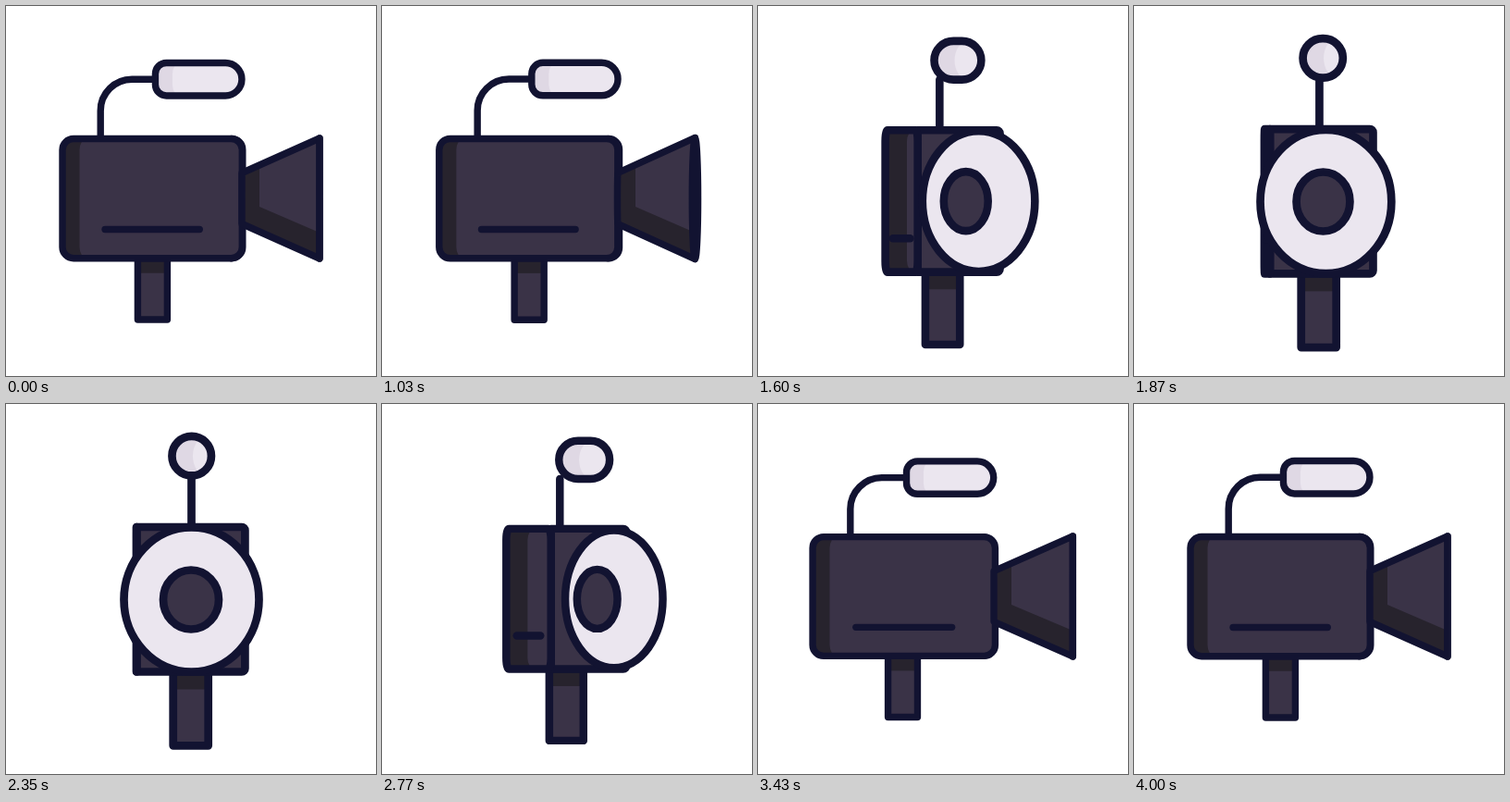
Write an HTML page with a canvas that moves like this. It is 400x400 px and loops after 4030 ms.

```html
<!DOCTYPE html>
<html lang="en">
<head>
<meta charset="utf-8">
<title>Video camera</title>
<style>
html, body { margin: 0; width: 100%; height: 100%; overflow: hidden; background: #fff; }
canvas { display: block; width: 400px; height: 400px; }
</style>
</head>
<body>
<canvas id="stage"></canvas>
<script>
const canvas = document.getElementById('stage');
const ctx = canvas.getContext('2d');
const dpr = window.devicePixelRatio || 1;
canvas.width = canvas.height = 400 * dpr;

const LOOP = 4030, START = 1030, STEP = 30;
const INK = '#121331', BODY = '#3a3347', DARK = '#27232d', LIGHT = '#ebe6ef', SHADE = '#dfd8e4';

// Turn amount over time: 0 = side view, 1 = facing the viewer.
const keys = [
  [1000, 0], [1030, 0.004], [1150, 0.05], [1270, 0.17], [1390, 0.378], [1540, 0.64],
  [1700, 0.84], [1870, 0.95], [2060, 1.01], [2180, 1.02], [2350, 1], [2480, 0.94],
  [2620, 0.81], [2850, 0.54], [3070, 0.265], [3170, 0.135], [3300, 0.03],
  [3420, -0.008], [3560, -0.019], [3720, -0.012], [4000, 0]
];

function slope(i) {
  if (i === 0 || i === keys.length - 1) return 0;
  const [a, b] = [keys[i - 1], keys[i + 1]];
  return (b[1] - a[1]) / (b[0] - a[0]);
}

function turnAt(t) {
  if (t < START || t >= 4000) return 0;
  let i = 0;
  while (t >= keys[i + 1][0]) i++;
  const [t0, a] = keys[i], [t1, b] = keys[i + 1];
  const d = t1 - t0, s = (t - t0) / d, s2 = s * s, s3 = s2 * s;
  return a * (2 * s3 - 3 * s2 + 1) + b * (3 * s2 - 2 * s3) +
    d * (slope(i) * (s3 - 2 * s2 + s) + slope(i + 1) * (s3 - s2));
}

const mix = (a, b, k) => a + (b - a) * k;

function paint(fill, stroke = true) {
  if (fill) {
    ctx.fillStyle = fill;
    ctx.fill();
  }
  if (stroke) ctx.stroke();
}

// Rounded box from edge to edge, radii given as [x, y] for the left and right corners.
function box(x0, y0, x1, y1, left, right) {
  const l = { x: left[0], y: left[1] }, r = { x: right[0], y: right[1] };
  ctx.beginPath();
  ctx.roundRect(x0, y0, x1 - x0, y1 - y0, [l, r, r, l]);
}

function oval(x, y, rx, ry) {
  ctx.beginPath();
  ctx.ellipse(x, y, Math.max(rx, 0.01), Math.max(ry, 0.01), 0, 0, Math.PI * 2);
}

function poly(points) {
  ctx.beginPath();
  points.forEach(([x, y]) => ctx.lineTo(x, y));
  ctx.closePath();
}

function drawLeg(mid, bottom, w) {
  const half = mix(16, 19, w), foot = mix(339, 369.3, w);
  box(mid - half, bottom, mid + half, foot, [0, 0], [0, 0]);
  paint(BODY, false);
  ctx.fillStyle = DARK;
  ctx.fillRect(mid - half, bottom, half * 2, mix(16, 19, w));
  paint(null);
}

function drawMic(u, v, w, top) {
  const width = mix(93.5, 42.5, 1 - Math.pow(Math.abs(1 - u), 1.4));
  const mid = 208.2 - 7.5 * u + 66 * u * (1 - u);
  const h = mix(35.5, 42.5, w), cy = mix(79.2, 56.2, w);
  const x0 = mid - width / 2, x1 = mid + width / 2, y0 = cy - h / 2, y1 = cy + h / 2;

  const base = mix(102.2, 200.5, v);
  const bend = Math.max(0, Math.min(34, x0 - base));
  ctx.beginPath();
  ctx.moveTo(base, top);
  if (bend > 0) {
    ctx.lineTo(base, cy + 34);
    ctx.ellipse(base + bend, cy + 34, bend, 34, 0, Math.PI, Math.PI * 1.5);
    ctx.lineTo(x0, cy);
  } else {
    ctx.lineTo(base, cy + h / 2);
  }
  paint(null);

  const rl = Math.min(width / 2, mix(12, h / 2, Math.min(1, v * 1.25)));
  const rr = Math.min(width / 2, h / 2);
  const outline = () => box(x0, y0, x1, y1, [rl, rl], [rr, rr]);
  outline();
  paint(SHADE, false);
  ctx.save();
  ctx.clip();
  box(x0 + mix(18.5, 22.5, w), y0, x1 + 30, y1, [rl * 0.7, rl], [0, 0]);
  paint(LIGHT, false);
  ctx.restore();
  outline();
  paint(null);
}

function drawBody(left, right, edge, top, bottom, w) {
  const depth = right - edge;
  const r = mix(12, 3.5, Math.max(0, Math.min(1, depth / 40)));
  box(Math.min(edge, right - 12), top, right, bottom, [0, 0], [r, r]);
  paint(BODY);

  const width = edge - left, rx = 12 * Math.min(1, width / 194);
  const side = () => box(left, top, edge, bottom, [rx, 12], [rx, 12]);
  side();
  paint(DARK, false);
  ctx.save();
  ctx.clip();
  const strip = left + mix(18.5, 24, w);
  if (strip < edge) {
    box(strip, top, edge + 10, bottom, [8, 12], [0, 0]);
    paint(BODY, false);
  }
  ctx.restore();
  side();
  paint(null);

  const y = mix(241.5, 252.4, w);
  ctx.beginPath();
  ctx.moveTo(left + width * 0.237, y);
  ctx.lineTo(left + width * 0.763, y);
  paint(null);
}

function drawHorn(u, w, back) {
  const p = Math.max(0, u);
  const open = Math.min(1, Math.pow(p, back ? 0.72 : 0.57));
  const cx = 339 - 138.5 * u, cy = mix(208, 211.5, w);
  const rx = 73 * open, ry = 65 + 13 * open;
  const bx = 255 - 55 * Math.pow(p, 1.8), by = mix(27.5, 33, w);
  const brx = 27 * Math.pow(p, 0.7);

  const cone = () => {
    ctx.beginPath();
    ctx.moveTo(cx, cy - ry);
    ctx.lineTo(bx, cy - by);
    ctx.ellipse(bx, cy, Math.max(brx, 0.01), by, 0, -Math.PI / 2, Math.PI / 2, true);
    ctx.lineTo(cx, cy + ry);
    ctx.closePath();
  };
  cone();
  paint(DARK, false);
  ctx.save();
  ctx.clip();
  const lx = bx + 19;
  if (lx < cx) {
    poly([[lx, cy - 36 + 55 * p], [cx, cy - ry], [cx, cy + 37], [lx, cy + 9]]);
    paint(BODY, false);
  }
  ctx.restore();
  cone();
  paint(null);

  oval(cx, cy, rx, ry);
  paint(LIGHT, false);
  if (p > 0) {
    ctx.save();
    ctx.clip();
    oval(200 + 90 * (1 - u), cy, 30 * Math.pow(p, 0.7), 32);
    paint(BODY);
    ctx.restore();
  }
  oval(cx, cy, rx, ry);
  paint(null);
}

function draw(t) {
  const u = turnAt(t);
  const ease = k => 1 - Math.sign(1 - u) * Math.pow(Math.abs(1 - u), k);
  const v = ease(2.45), w = ease(1.7);
  const left = mix(61, 141, v);
  const mid = mix(158.4, 199.7, ease(4.6));
  const right = 2 * mid - left;
  const edge = Math.max(left + 0.1, 255.3 - 114 * u);
  const top = mix(143.5, 133, w), bottom = mix(272.7, 289.5, w);

  ctx.setTransform(dpr, 0, 0, dpr, 0, 0);
  ctx.fillStyle = '#fff';
  ctx.fillRect(0, 0, 400, 400);
  ctx.strokeStyle = INK;
  ctx.lineWidth = mix(7.4, 8.7, w);
  ctx.lineCap = ctx.lineJoin = 'round';

  drawLeg(mid, bottom, w);
  drawMic(u, v, w, top);
  drawBody(left, right, edge, top, bottom, w);
  drawHorn(u, w, t > 2350);
}

function frame() {
  let t = performance.now() % LOOP;
  t = t < START ? 0 : START + Math.floor((t - START) / STEP) * STEP;
  draw(t);
  requestAnimationFrame(frame);
}
frame();
</script>
</body>
</html>
```
